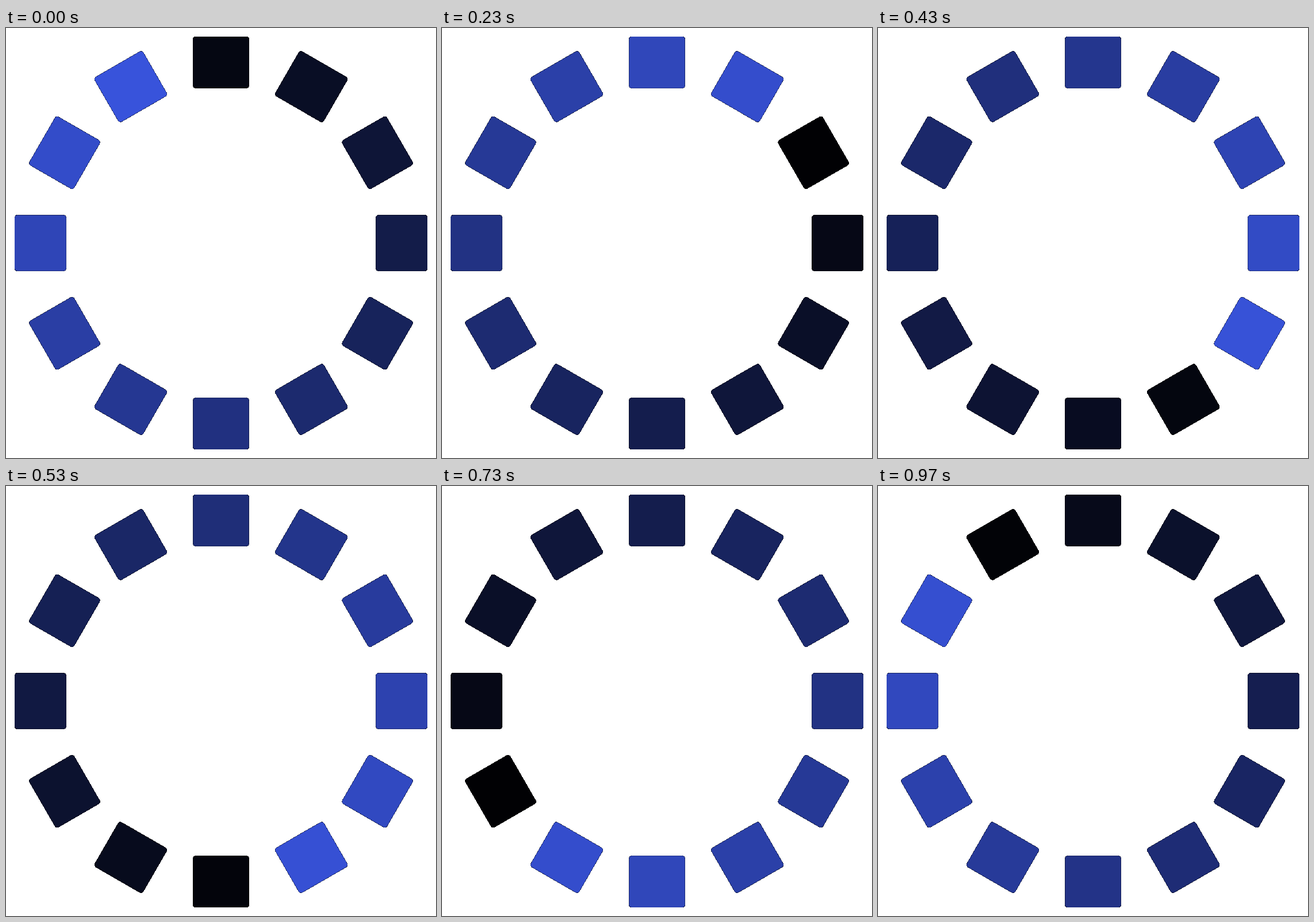
Animation of 748 by 748 pixels, one loop 1 s. Source, as an HTML page:

```html
<!DOCTYPE html>
<html lang="en">
<head>
<meta charset="utf-8">
<title>Spinner</title>
<style>
  html, body { margin: 0; width: 100%; height: 100%; overflow: hidden; background: #fff; }
  svg { display: block; width: 100vw; height: 100vh; }
</style>
</head>
<body>
<svg viewBox="0 0 748 748">
  <!-- Hard outer edge: faintly covered pixels drop out, the others are backed with black. -->
  <filter id="hardEdge" filterUnits="userSpaceOnUse" x="0" y="0" width="748" height="748"
          color-interpolation-filters="sRGB">
    <feColorMatrix in="SourceGraphic" result="black"
                   values="0 0 0 0 0  0 0 0 0 0  0 0 0 0 0  0 0 0 255 -25.5"/>
    <feComposite in="SourceGraphic" in2="black" operator="atop"/>
  </filter>
  <g filter="url(#hardEdge)"><g id="ring" transform="scale(7.48)"></g></g>
</svg>
<script>
  const COUNT = 12, FPS = 30, LOOP = 1000, MICRO = 1e6;
  const BLUE = [56, 83, 219];
  const ring = document.getElementById('ring');

  function makeTile(i) {
    const tile = document.createElementNS('http://www.w3.org/2000/svg', 'rect');
    const attrs = {
      x: 43.5, y: 2, width: 13, height: 12, rx: 0.65, ry: 0.6,
      transform: `rotate(${i * 360 / COUNT} 50 50)`
    };
    for (const name in attrs) tile.setAttribute(name, attrs[name]);
    return ring.appendChild(tile);
  }

  const tiles = Array.from({ length: COUNT }, (_, i) => makeTile(i));

  // Steps fall at 0, 30 and 70 ms within each 100 ms.
  function stepAt(ms) {
    const t = ms % LOOP + 0.01, rest = t % 100;
    return 3 * Math.floor(t / 100) + (rest >= 30) + (rest >= 70);
  }

  // Whole microseconds decide whether a tile at the wrap is full or gone.
  function render(ms) {
    const now = Math.floor(stepAt(ms) * MICRO / FPS);
    tiles.forEach((tile, i) => {
      const lead = Math.floor((COUNT - 1 - i) * MICRO / COUNT);
      const light = 1 - (now + lead) % MICRO / MICRO;
      const shade = BLUE.map(c => Math.round(c * light));
      tile.setAttribute('fill', light < 0.001 ? 'none' : `rgb(${shade})`);
    });
  }

  function tick() {
    render(performance.now());
    requestAnimationFrame(tick);
  }
  tick();
</script>
</body>
</html>
```
